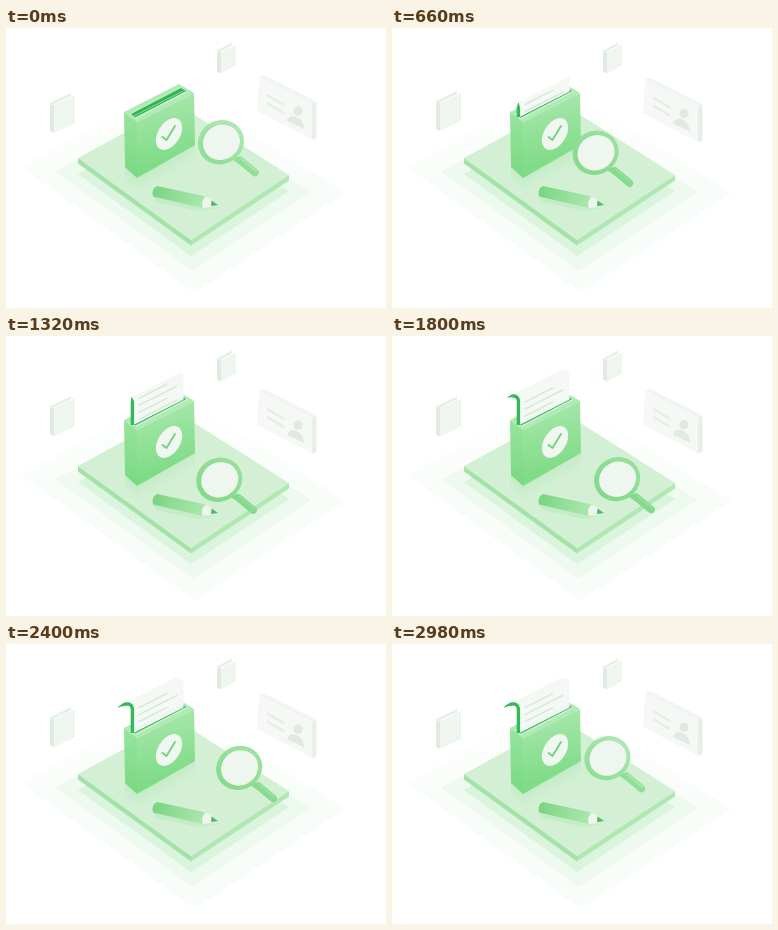
Recreate the animation shown at these times as an HTML page with a canvas. Size 380x280 px, loop 3 s.

```html
<!DOCTYPE html>
<html lang="en">
<head>
<meta charset="utf-8">
<title>Isometric folder</title>
<style>
html, body { margin: 0; width: 100%; height: 100%; overflow: hidden; background: #fff; }
canvas { display: block; }
</style>
</head>
<body>
<canvas id="stage" width="380" height="280"></canvas>
<script>
const ctx = document.getElementById('stage').getContext('2d');
const LOOP = 3000, TAU = Math.PI * 2;

function trace(pts) {
  ctx.beginPath();
  for (let i = 0; i < pts.length; i += 2) ctx.lineTo(pts[i], pts[i + 1]);
}
function poly(fill, ...pts) {
  trace(pts);
  ctx.closePath();
  ctx.fillStyle = fill;
  ctx.fill();
}
// Parallelogram from a corner along (dx, dy), then down by h.
function wall(fill, x, y, dx, dy, h) {
  poly(fill, x, y, x + dx, y + dy, x + dx, y + dy + h, x, y + h);
}
function line(color, width, ...pts) {
  trace(pts);
  ctx.strokeStyle = color;
  ctx.lineWidth = width;
  ctx.stroke();
}
function oval(fill, x, y, rx, ry, turn = 0) {
  ctx.beginPath();
  ctx.ellipse(x, y, rx, ry, turn, 0, TAU);
  ctx.fillStyle = fill;
  ctx.fill();
}
function grad(x0, y0, x1, y1, ...colors) {
  const g = ctx.createLinearGradient(x0, y0, x1, y1);
  colors.forEach((c, i) => g.addColorStop(i / (colors.length - 1), c));
  return g;
}

// The ground diamond, scaled by k around (178, y).
function diamond(fill, y, k) {
  poly(fill, 178 - 106 * k, y - 17 * k, 178 - 7 * k, y - 71 * k,
    178 + 105 * k, y, 178 + 7 * k, y + 65 * k);
}

function platform() {
  diamond(grad(0, 65, 0, 150, '#ffffff', '#f9fdf9'), 165, 1.54);
  diamond(grad(0, 85, 0, 145, '#ffffff', '#eef9ef'), 164, 1.213);
  diamond('#dbf4dd', 163, 1);
  wall('#a3e3a8', 72, 130, 113, 82, 5.5);
  wall('#b0e8b4', 185, 212, 98, -65, 5.5);
  diamond('#d3f0d5', 147, 1);
  const glow = 'rgba(150,224,156,.28)', clear = 'rgba(190,234,193,0)';
  wall(grad(119, 139, 109, 151, glow, clear), 119, 139, 12, 10, 20);
  wall(grad(131, 149, 140, 165, glow, clear), 131, 149, 58, -33, 20);
}

function smallCard(x, y, w, rise, h) {
  wall('#e0eae1', x, y, 4, 2, h);
  wall('#e7efe8', x, y, w, -rise, 3);
  wall('#eef6ef', x + 4, y + 2, w, -rise, h);
}

function idCard(dy) {
  ctx.save();
  ctx.translate(0, dy);
  poly('#f1f5f1', 253, 49, 258, 47, 311, 74, 306, 76);
  wall('#e7efe8', 305.5, 76, 5, -2, 36);
  poly('#f6f8f6', 253, 49, 306, 76, 305, 111, 251, 83);
  for (const y of [67, 75]) line('#e7ece7', 2.4, 261, y, 278, y + 10);
  oval('#e2e9e2', 292, 83, 4.6, 4.6);
  ctx.beginPath();
  ctx.moveTo(281, 93);
  ctx.bezierCurveTo(283, 84, 298, 88, 298, 101);
  ctx.closePath();
  ctx.fill();
  ctx.restore();
}

// Point on the sheet's near edge, s pixels above the slot: straight, then curling over.
function edge(s) {
  if (s <= 23) return [126.4, 89 - s];
  const u = Math.min(1, (s - 23) / 18), v = 1 - u;
  const bez = (a, b, c, d) => v * v * v * a + 3 * v * v * u * b + 3 * v * u * u * c + u * u * u * d;
  return [bez(126.4, 126.4, 121, 112), bez(66, 59.5, 57.5, 63.5)];
}

function sheet(len) {
  if (len < 0.3) return;
  const STEPS = 40, dx = 51, dy = -26;
  const pts = Array.from({ length: STEPS + 1 }, (_, i) => edge(len * i / STEPS));
  for (let i = STEPS; i > 0; i--) {
    const [x0, y0] = pts[i - 1], [x1, y1] = pts[i];
    poly('#f5f8f5', x0, y0 + .4, x1, y1 - .3, x1 + dx, y1 + dy - .3, x0 + dx, y0 + dy + .4);
  }
  for (let d = 5, n = 0; d < len - 1; d += 7, n++) {
    if (len - d > 25) continue;
    const [x, y] = edge(len - d), end = n % 2 ? .88 : .68;
    line('#d5e9d7', 1.5, x + dx * .12, y + dy * .12, x + dx * end, y + dy * end);
  }
  // the dark edge narrows toward its tip
  const left = [], right = [];
  pts.forEach(([x, y], i) => {
    const [ax, ay] = pts[Math.max(0, i - 1)], [bx, by] = pts[Math.min(STEPS, i + 1)];
    const l = Math.hypot(bx - ax, by - ay);
    const w = Math.min(1.7, .3 + (len - len * i / STEPS) * .28);
    const nx = (by - ay) / l * w, ny = (ax - bx) / l * w;
    left.push(x + nx, y + ny);
    right.unshift(x - nx, y - ny);
  });
  poly('#35ba5b', ...left, ...right);
}

function book(len) {
  poly('#afe9b3', 118, 84, 173, 56, 188, 65, 131, 94);
  poly('#c7f0ca', 123, 86, 175, 59, 182, 64, 130, 91);
  poly('#30b557', 125, 86, 175, 60, 180, 63, 129, 89.5);
  line('#8adb93', 1, 128, 88, 177, 63);
  sheet(len);
  poly(grad(0, 84, 0, 150, '#98e49d', '#78d980'), 118, 84, 131, 94, 131, 150, 119, 139);
  poly(grad(155, 75, 170, 135, '#a3e6a8', '#7edb86'), 131, 94, 188, 65, 189, 117, 131, 150);
  oval('#f0f7f0', 163, 106, 17.4, 11, -1.01);
  ctx.lineCap = ctx.lineJoin = 'round';
  line('#6fd37b', 1.8, 156.5, 109, 160.5, 112, 169, 98);
  ctx.lineCap = 'butt';
}

function pencil() {
  poly('rgba(158,224,163,.3)', 147, 168, 197, 179, 210, 180, 192, 183, 150, 174);
  ctx.beginPath();
  ctx.moveTo(151, 158);
  ctx.lineTo(200, 168.5);
  ctx.lineTo(197, 180);
  ctx.lineTo(147, 168.5);
  ctx.quadraticCurveTo(145, 161, 151, 158);
  ctx.fillStyle = grad(147, 160, 198, 174, '#78d480', '#94de99', '#abe6ae');
  ctx.fill();
  poly('#edf5ec', 199, 168.5, 206, 172, 205.5, 179, 196.5, 180, 196, 174);
  poly('#55b66c', 205.5, 172.5, 212, 177, 205, 178);
}

// Circles once per loop, counter-clockwise, with a slight sway in speed.
function lens(phase, wave) {
  const sway = 13 - 7.5 * Math.cos(phase) + 8.9 * Math.sin(2 * phase - .666);
  const a = (257 + sway) * Math.PI / 180 - phase;
  const k = Math.min(1, wave * 2);
  const tone = (p, q) => `rgb(${p.map((v, i) => Math.round(v + (q[i] - v) * k))})`;
  const pale = tone([174, 231, 178], [150, 224, 155]);
  const deep = tone([145, 222, 151], [132, 218, 138]);
  ctx.save();
  ctx.translate(218.5 + 15.6 * Math.cos(a), 129.2 + 15.4 * Math.sin(a));
  ctx.lineCap = 'round';
  line(deep, 5, 12, 15, 20, 20);
  line(deep, 7.4, 19, 18, 34, 30.5);
  line(pale, 1.5, 20, 16.5, 35, 29);
  ctx.lineCap = 'butt';
  oval(grad(12, -18, -12, 18, pale, deep), 0, 0, 23.4, 21.8, -.5);
  oval(deep, 0, .2, 19.5, 18, -.5);
  oval('#eff6ef', .5, 0, 18.9, 17.4, -.5);
  ctx.restore();
}

function draw(now) {
  const t = now % LOOP, phase = t / LOOP * TAU;
  const wave = (1 - Math.cos(phase)) / 2;
  ctx.fillStyle = '#fff';
  ctx.fillRect(0, 0, 380, 280);
  platform();
  smallCard(44, 75 - 5 * wave, 21, 10, 28);
  smallCard(211, 22.6, 15, 8, 21);
  idCard(6.3 * wave);
  book(Math.min(41, t * .0214));
  pencil();
  lens(phase, wave);
}

const start = performance.now();
function tick() {
  draw(performance.now() - start);
  requestAnimationFrame(tick);
}
tick();
</script>
</body>
</html>
```
